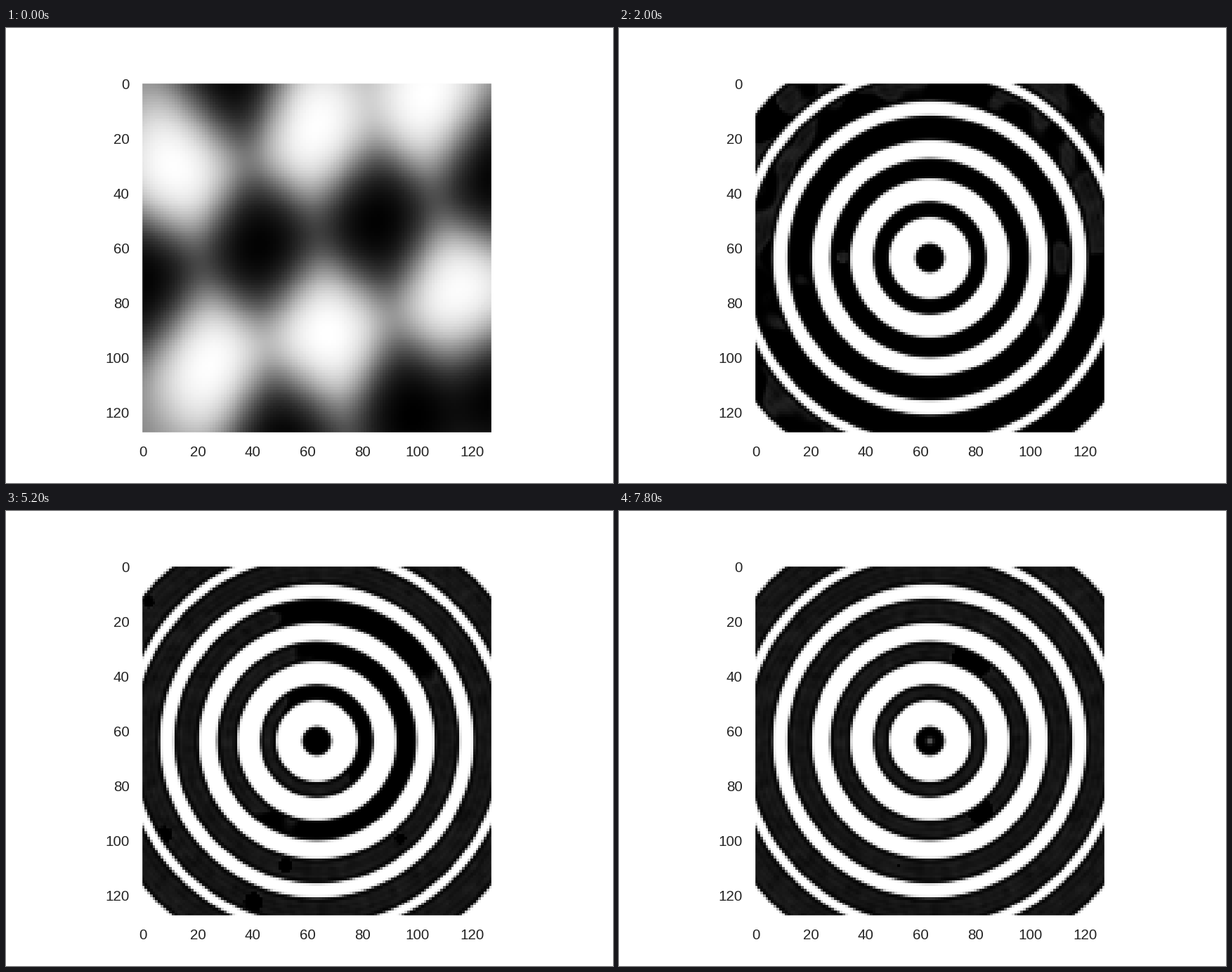
Recreate the animation shown at these times as a matplotlib script. Size 864 by 648 pixels, loop 8 s.

```python
import numpy as np
import matplotlib.pyplot as plt
from matplotlib.animation import FuncAnimation

N, FRAMES, STEP = 128, 40, 200

plt.rcParams.update({
    "font.family": "Liberation Sans",
    "axes.edgecolor": "white",
    "axes.linewidth": 1.25,
    "xtick.labelsize": 11,
    "ytick.labelsize": 11,
})

y, x = np.mgrid[:N, :N].astype(float)
MID = (N - 1) / 2
radius = np.hypot(x - MID, y - MID)
angle = np.arctan2(y - MID, x - MID)

# Radii where the rings switch between black and white
EDGES = [5.4, 14.9, 20.8, 28.9, 36.4, 43.1, 52.1, 57.2, 67.4, 70.8, 82.7]

# Greying of each dark band: first second, spread, latest direction, sharpness
BANDS = [(3, 4.2, 315, 1), (3.8, 3.2, 10, 1), (2.6, 4.3, 285, 4),
         (1.9, 2.2, 75, 4), (1.7, 2.3, 45, 4)]

# Spots that turn grey later or sooner: x, y, size, delay
SPOTS = [(78, 34, 6, 4), (82, 90, 3, 4), (94, 99, 2, 4), (52, 109, 2, 5),
         (70, 3, 3, 3), (8, 98, 3, 4), (40, 122, 3, 3), (2, 13, 4, 4),
         (17, 72, 4, -1), (109, 60, 8, -1.6), (31, 63, 5, -2),
         (46, 64, 3, -1.5)]

# Blobs of the opening field
BRIGHT = [(66, 92), (13, 30), (62, 16), (105, 6), (25, 102), (116, 78)]
DARK = [(43, 60), (85, 50), (0, 72), (98, 120), (51, 128), (33, -2),
        (128, 32), (128, 112)]

# Places where the young rings are smeared
SMEARS = [(75, 9), (72, 28), (106, 28), (116, 18), (123, 4), (104, 42),
          (5, 102), (17, 95), (3, 122), (53, 118)]


def bump(cx, cy, sx, sy):
    return np.exp(-((x - cx) / sx) ** 2 / 2 - ((y - cy) / sy) ** 2 / 2)


def smooth_noise(seed, sigma):
    raw = np.random.default_rng(seed).normal(size=(N, N))
    f = np.fft.fftfreq(N)
    low = np.exp(-2 * (np.pi * sigma) ** 2 * (f[:, None] ** 2 + f ** 2))
    out = np.fft.ifft2(np.fft.fft2(raw) * low).real
    return out / out.std()


def ramp(v, lo, hi):
    s = np.clip((v - lo) / (hi - lo), 0, 1)
    return s * s * (3 - 2 * s)


def rings(r, soft):
    return sum((-1) ** i / (1 + np.exp(np.clip((e - r) / soft, -50, 50)))
               for i, e in enumerate(EDGES))


def opening_field():
    light = sum(bump(*p, 11, 14) for p in BRIGHT) + .1 * bump(*BRIGHT[0], 11, 14)
    dark = sum(bump(*p, 11, 14) for p in DARK)
    out = (.12 + .95 * light) / (.25 + light + dark)
    return (out - out.min()) / np.ptp(out)


warp = smooth_noise(3, 5)
haze = smooth_noise(5, 3)
grain = smooth_noise(7, .9)
smear = .55 * sum(bump(*p, 4, 4) for p in SMEARS)

# Onset time and grey level of every cell in the dark bands
onset = np.full((N, N), 99.0)
grey = np.zeros((N, N))
shift = .3 * haze + sum(d * bump(cx, cy, s, s) for cx, cy, s, d in SPOTS)
for lo, hi, (first, spread, late, sharp) in zip(EDGES[1::2], EDGES[2::2], BANDS):
    inside = (radius > lo) & (radius < hi)
    facing = (1 + np.cos(angle - np.radians(late))) / 2
    gap = np.minimum(radius - lo, hi - radius)
    tone = .085 + .012 * np.cos(2.4 * gap) + .011 * grain
    onset[inside] = (first + spread * facing ** sharp + shift)[inside]
    grey[inside] = (tone * ramp(gap, .6, 1.9))[inside]
onset = np.where(onset < 99, np.maximum(onset, 1.3), onset)

start = opening_field()


def picture(i):
    if i == 0:
        return start
    t = i * STEP / 1000
    young = np.exp((.6 - t) / .25)
    r = radius + .3 * young * warp
    blurred = np.clip(.85 * rings(r, 2.2) + .06 * haze, 0, 1)
    mix = np.clip(young * smear, 0, .8)
    img = rings(r, .2 + .16 * young) * (1 - mix) + blurred * mix
    age = t - onset
    rim = .035 * np.exp(-((age - .12) / .15) ** 2) * (grey > .05)
    img += grey * ramp(age, -.1, .2) + rim
    img += .45 * ramp(t, 5.2, 6.7) * np.exp(-(radius / 1.2) ** 2)
    return np.clip(img, 0, 1)


fig, ax = plt.subplots(figsize=(6.4, 4.8), dpi=135, facecolor="white")
image = ax.imshow(start, cmap="gray", vmin=0, vmax=1)
ax.set_xticks(range(0, N, 20))
ax.set_yticks(range(0, N, 20))
ax.tick_params(length=6, pad=3.5, left=False, bottom=False, labelcolor=".15")


def update(i):
    image.set_data(picture(i))
    return [image]


anim = FuncAnimation(fig, update, frames=FRAMES, interval=STEP,
                     repeat=True, repeat_delay=0)
plt.show()
```
